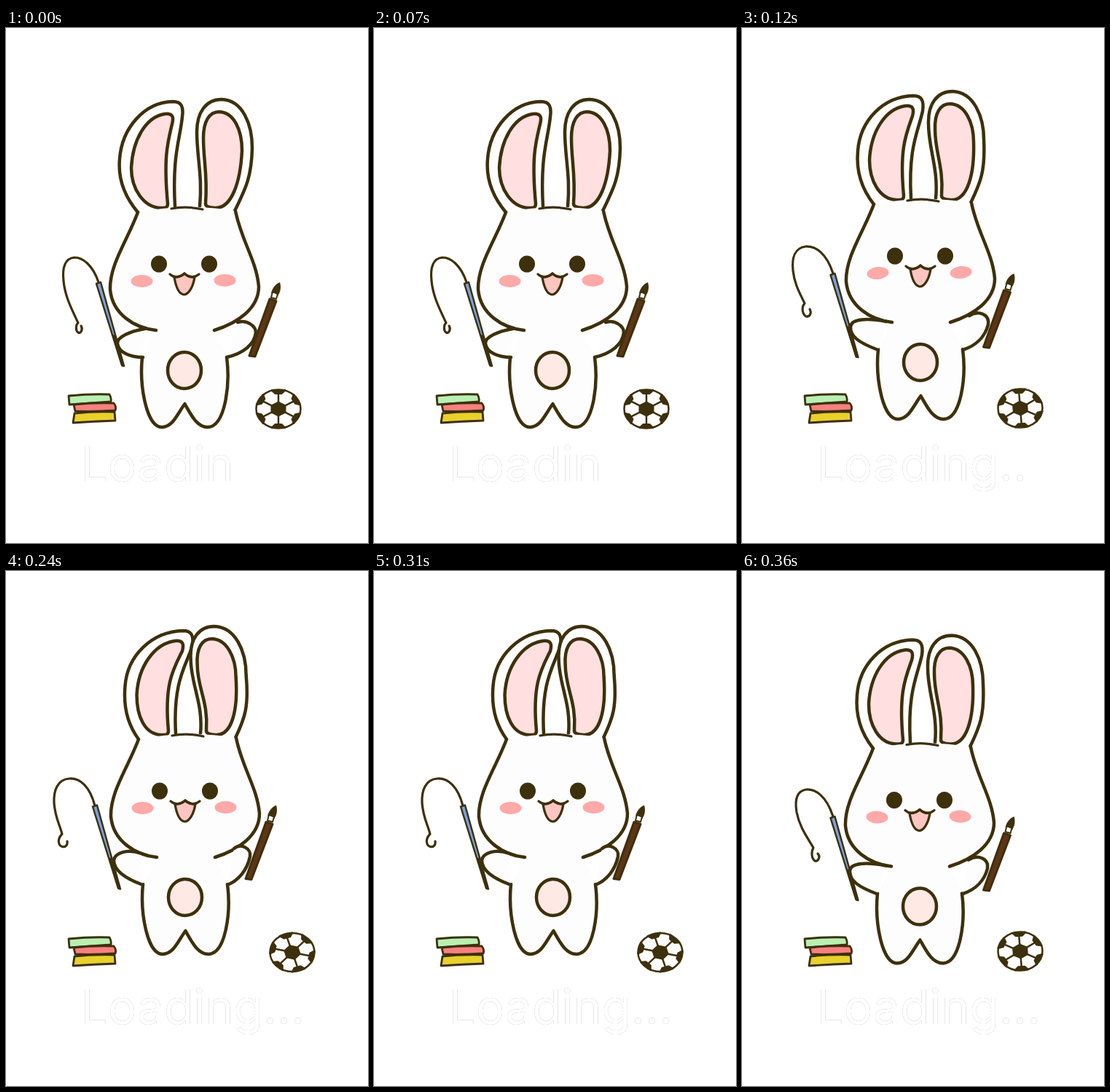
Write an HTML page that moves like this. It is 497 px wide and 707 px high and loops after 480 ms.

```html
<!DOCTYPE html>
<html lang="en">
<head>
<meta charset="utf-8">
<title>Loading</title>
<style>
  html, body { margin: 0; width: 100%; height: 100%; overflow: hidden; background: #fff; }
  svg { display: block; width: 100%; height: 100%; }
  .line { fill: none; stroke: #3d300c; stroke-width: 4.5; stroke-linecap: round; stroke-linejoin: round; }
  .thin { stroke-width: 3.2; }
  .fur { fill: #fdfdfd; }
  .ear { fill: #fff; }
  .pink { fill: #ffdfdf; }
  .dark { fill: #3d300c; }
  .cheek { fill: #ffa9a8; }
  text { font: 400 66px Inter, "Liberation Sans", sans-serif; fill: #fff; filter: drop-shadow(.6px .6px 0 #999); }
</style>
</head>
<body>
<svg viewBox="0 0 497 707">
  <g id="bunny">
    <path class="line ear" id="earL"/>
    <path class="line pink" id="innerL"/>
    <path class="line ear" id="earR"/>
    <path class="line pink" id="innerR"/>
    <path class="fur" d="M206 415H286L303 452H187Z"/>
    <path class="line fur" d="M187 452C183 492 193 548 214 548C229 548 235 530 245.500 516C254 531 262 548 277 548C301 547 308 490 303 452"/>
    <path class="fur" d="M181 253C166 293 142 325 143 359C146 393 177 412 206 415H286C318 405 347 385 347 355C344 319 323 292 315 251Q247 240 181 253"/>
    <path class="line" d="M181 253C166 293 142 325 143 359C146 393 177 412 206 415M286 415C318 405 347 385 347 355C344 319 323 292 315 251"/>
    <path class="line thin" d="M227 248Q248 244 270 249"/>
    <path class="line fur" id="armL"/>
    <path class="line fur" id="armR"/>
    <ellipse class="line" style="fill:#ffe9e5" cx="245" cy="470" rx="23" ry="25"/>
    <ellipse class="dark" cx="210" cy="324" rx="11" ry="11.5"/>
    <ellipse class="dark" cx="279" cy="324" rx="11" ry="11.5"/>
    <ellipse class="cheek" id="cheekL" cx="186.500" cy="347.500" rx="15" ry="8.500"/>
    <ellipse class="cheek" id="cheekR" cx="300.500" cy="346.500" rx="15" ry="8.500"/>
    <path class="line thin" style="fill:#ffc6c1" d="M231 342Q240 342 245 337Q250 342 259 342C257 355 251 366 244 366C237 365 233 354 231 342Z"/>
    <path class="line thin" d="M225 338Q234 346 245 337Q255 346 265 338"/>
  </g>

  <path class="line thin" id="string" transform="translate(1 0)"/>
  <g id="tools">
    <path class="line" style="fill:#7ba2e0;stroke-width:2.500" d="M124 351L130 349L162 464L159 463Z"/>
    <path class="line" style="stroke-width:3.500" d="M148 423L160 463"/>
    <path class="line" style="fill:#5f3516;stroke-width:3" d="M362 372L371 375L342 451L334 450Z"/>
    <path class="line" style="fill:#fff;stroke-width:2" d="M366 362L373 365L371 372L364 370Z"/>
    <path class="dark" d="M364 364C366 356 371 351 376 349C378 356 377 362 373 368L371 363Z"/>
  </g>

  <g class="line" style="stroke-width:2.800">
    <path fill="#b9f0b2" d="M86 505Q115 502 142 503Q145 508 144 513Q115 515 87 517Z"/>
    <path fill="#f98080" d="M93 517Q120 514 148 515Q152 520 150 525Q120 527 95 526Z"/>
    <path fill="#ead02c" d="M94 529Q120 526 149 527L150 539Q120 540 92 542Z"/>
  </g>

  <g id="ball"></g>
  <text id="label" x="102.500" y="622"></text>
</svg>
<script>
const STEP = 120;
const $ = id => document.getElementById(id);

const restArms = ["M190 413C172 416 152 424 153 433C154 445 170 452 188 452",
                  "M318 404C332 400 343 410 343 418C341 435 325 447 303 452"];
const midArms  = ["M198 414C172 409 150 410 149 421C148 434 160 443 187 453",
                  "M312 406C325 398 340 404 338 418C334 434 322 447 303 453"];
const highArms = ["M185 410C165 402 148 410 147 419C147 434 165 445 187 453",
                  "M312 403C322 395 336 403 334 414C330 433 318 447 303 453"];

// body and tools: offsets; ears: sideways bend of each tip; ball: x, y, turn
const poses = [
  { body: [0, 0], ears: [0, 0], arms: restArms, tilt: 0, tools: [0, 0], ball: [374, 523, 0], text: "Loadin",
    string: "M126 349C118 325 104 315 93 315C80 316 76 329 78 347C80 370 91 389 98 405C95 407 94 415 98 418C102 420 105 413 102 409" },
  { body: [0, -11], ears: [6, -7], arms: midArms, tilt: -6, tools: [-2.5, -12], ball: [382, 522, -4], text: "Loading..",
    string: "M124 337C115 309 100 299 86 300C72 302 67 315 69 333C71 352 79 365 85 378C80 384 82 393 87 396C92 397 95 391 92 386" },
  { body: [1, -22], ears: [13, -11], arms: highArms, tilt: 0, tools: [-5, -27.5], ball: [393, 523.5, -17], text: "Loading...",
    string: "M121 322C114 296 101 284 86 285C70 286 64 301 65 319C67 340 72 346 76 361C70 367 70 375 75 378C80 380 84 377 83 371" },
  { body: [-1, -9.5], ears: [6, -7], arms: midArms, tilt: 3, tools: [-2.5, -12], ball: [382, 522, -4], text: "Loading...",
    string: "M124 337C115 309 100 299 87 300C75 302 71 313 74 331C78 352 89 366 97 380C94 385 94 394 99 398C104 399 107 392 103 388" }
];

// The ears bend from a fixed root, most strongly at the tip.
function leftEar(s) {
  const half = s * .5, drop = Math.min(3, s * .5);
  return [
    `M181 253C${160 + s * .2} 228 ${154 + half} 202 ${156 + half} 180C${159 + half} 138 ${189 + s * .8} ${102 + drop} ${229 + s} ${101 + drop}
     C${241 + s} ${101 + drop} ${244 + s} ${108 + drop} ${242 + s} ${122 + drop}C${239 + half} 153 228 174 232 245`,
    `M222 241C222 247 219 247 212 247C189 246 ${172 + half} 221 ${172 + half} 192C${174 + half} 153 ${192 + s * .8} 122 ${218 + s} 118
     C${228 + s} 117 ${231 + s} 121 ${228 + s} 132C${222 + half} 157 216 177 222 241Z`
  ];
}
function rightEar(s) {
  const most = s * .85;
  return [
    `M266 245C270 204 ${262 + most} 177 ${262 + most} 143C${262 + s} 115 ${275 + s} 98 ${296 + s} 98
     C${325 + s} 99 ${338 + most} 132 ${338 + most} 165C${337 + s * .4} 208 327 224 314 251`,
    `M274 240C277 202 ${271 + most} 182 ${271 + most} 151C${271 + s} 128 ${279 + s} 115 ${293 + s} 115
     C${313 + s} 116 ${324 + most} 140 ${324 + most} 168C${322 + s * .4} 211 310 248 287 247C279 247 273 245 274 240Z`
  ];
}

function ballMarkup([x, y, turn]) {
  const at = (angle, r) => {
    const a = (angle + turn) * Math.PI / 180;
    return [32 * r * Math.cos(a), 28 * r * Math.sin(a)].map(v => v.toFixed(1)).join();
  };
  let core = "", seams = "";
  for (let angle = 30; angle < 390; angle += 60) {
    core += at(angle, .38) + " ";
    seams += `M${at(angle, .3)}L${at(angle, .8)}`;
    seams += `M${at(angle - 17, .96)}L${at(angle - 10, .77)}L${at(angle + 10, .77)}L${at(angle + 17, .96)}Z`;
  }
  return `<g transform="translate(${x} ${y})">
    <ellipse class="line" style="fill:#fff;stroke-width:2.500" rx="30.500" ry="26.500"/>
    <polygon class="dark" points="${core}"/>
    <path class="line dark" style="stroke-width:2.500" d="${seams}"/></g>`;
}

const set = (id, name, value) => $(id).setAttribute(name, value);
let shown = -1;

function draw(now) {
  const index = Math.floor(now / STEP) % poses.length;
  if (index === shown) return;
  shown = index;
  const p = poses[index];
  const [earL, innerL] = leftEar(p.ears[0]);
  const [earR, innerR] = rightEar(p.ears[1]);
  const shapes = { earL, innerL, earR, innerR, armL: p.arms[0], armR: p.arms[1], string: p.string };
  for (const id in shapes) set(id, "d", shapes[id]);
  set("bunny", "transform", `translate(${p.body})`);
  set("cheekL", "transform", `rotate(${p.tilt} 186.5 347.5)`);
  set("cheekR", "transform", `rotate(${p.tilt} 300.5 346.5)`);
  set("tools", "transform", `translate(${p.tools})`);
  $("ball").innerHTML = ballMarkup(p.ball);
  $("label").textContent = p.text;
}

const start = performance.now();
function tick() {
  draw(performance.now() - start);
  requestAnimationFrame(tick);
}
tick();
</script>
</body>
</html>
```
